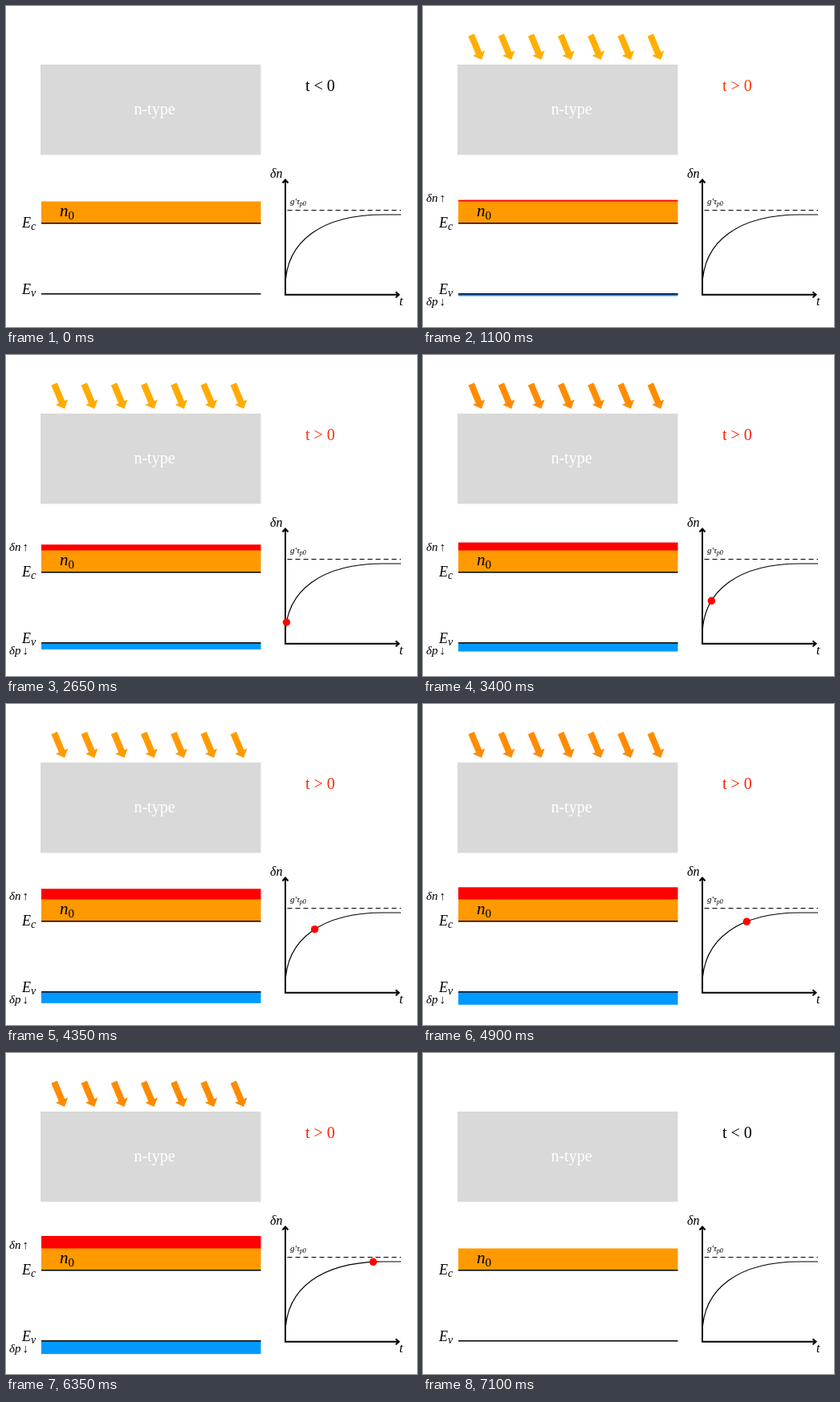
Write an HTML page that moves like this. It is 512 px wide and 400 px high and loops after 7.15 s.

```html
<!DOCTYPE html>
<html lang="en">
<head>
<meta charset="utf-8">
<title>Excess carriers under illumination</title>
<style>
  html, body { margin: 0; width: 100%; height: 100%; overflow: hidden; background: #fff; }
  svg { display: block; }
  text { font: 20px "Liberation Serif", serif; }
  .m { font-style: italic; }
  .up { font-style: normal; }
  .line { fill: none; stroke: #000; }
</style>
</head>
<body>
<svg width="512" height="400" viewBox="0 0 512 400">
  <defs>
    <path id="arrow" d="M-4-33.5H4V-9H8.3L0 0L-8.3-9H-4Z"/>
  </defs>

  <rect x="43" y="73" width="274.5" height="112.5" fill="#d9d9d9"/>
  <text x="185" y="135" text-anchor="middle" fill="#fff">n-type</text>
  <text id="phase" x="373" y="106"></text>

  <g id="light">
    <g id="arrows"></g>
    <rect id="electrons" x="44" width="273.5" fill="#f00"/>
    <rect id="holes" x="44" y="358.5" width="273.5" fill="#09f"/>
    <text class="m" x="4" y="244" style="font-size:15px">δn<tspan class="up" x="20.5">↑</tspan></text>
    <text class="m" x="4" y="373" style="font-size:15px">δp<tspan class="up" x="20.5">↓</tspan></text>
  </g>

  <rect x="44" y="243.5" width="273.5" height="27" fill="#f90"/>
  <path class="line" stroke-width="1.5" d="M44 270.7H317.5M44 358.7H317.5"/>
  <text class="m" x="67" y="262" style="font-size:21px">n<tspan class="up" dy="3.5" style="font-size:15px">0</tspan></text>
  <text class="m" x="20" y="275.5" style="font-size:18px">E<tspan dy="3" style="font-size:14px">c</tspan></text>
  <text class="m" x="20" y="358.5" style="font-size:18px">E<tspan dy="3" style="font-size:14px">v</tspan></text>

  <path class="line" stroke-width="2" d="M348 360.5V217M344.5 220.5L348 216.5L351.5 220.5M347 359.7H489M485.5 356.2L489.5 359.7L485.5 363.2"/>
  <path class="line" stroke-dasharray="6 4" d="M350.5 254.5H492"/>
  <path class="line" id="curve" stroke-width="1.2" d="M348 359V350C348 292 395 260 470 260H492"/>
  <text class="m" x="329" y="214" style="font-size:16px">δn</text>
  <text class="m" x="490" y="373" style="font-size:16px">t</text>
  <text class="m" x="354" y="247" style="font-size:11px">g′τ<tspan dy="1.5" style="font-size:8px">p0</tspan></text>
  <circle id="dot" r="4.7" fill="#f00"/>
</svg>
<script>
const LOOP = 7150, ON = 1000, DOT_ON = 2000, OFF = 7100;
const $ = id => document.getElementById(id);
const show = (el, on) => el.setAttribute("visibility", on ? "visible" : "hidden");

for (let i = 0; i < 7; i++) {
  $("arrows").innerHTML += `<use href="#arrow" transform="translate(${73 + 37.2 * i} 67) rotate(-22.7)"/>`;
}

function draw(time) {
  const lit = time >= ON && time < OFF;
  const since = time - ON;
  show($("light"), lit);
  show($("dot"), lit && time >= DOT_ON);
  $("phase").textContent = lit ? "t > 0" : "t < 0";
  $("phase").setAttribute("fill", "#000");
  if (!lit) return;

  // Colour pulse between orange and amber
  const glow = Math.abs(1 - (since % 1500) / 750) ** 1.5;
  $("arrows").setAttribute("fill", `rgb(255 ${136 + 49 * glow} 0)`);
  $("phase").setAttribute("fill", `rgb(255 ${28 + 32 * glow} 0)`);

  // Excess carrier bands grow for four seconds
  const size = 2 + 14 * Math.min(since / 4000, 1);
  $("electrons").setAttribute("y", 244 - size);
  $("electrons").setAttribute("height", size);
  $("holes").setAttribute("height", size + 0.6);

  const p = $("curve").getPointAtLength(1.2 + 0.0382 * Math.max(time - DOT_ON, 0));
  $("dot").setAttribute("cx", p.x);
  $("dot").setAttribute("cy", p.y);
}

const start = performance.now();
function tick() {
  draw((performance.now() - start) % LOOP);
  requestAnimationFrame(tick);
}
tick();
</script>
</body>
</html>
```
